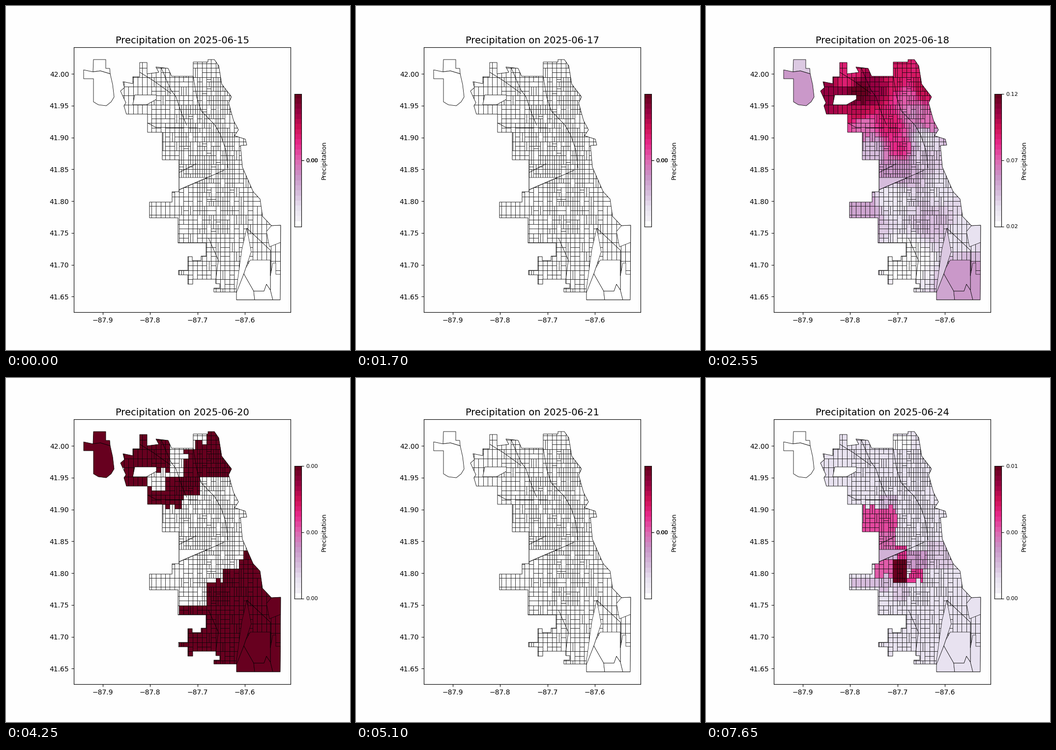
A matplotlib script that plays this animation: 700x700 px, repeating every 8000 ms.

```python
import random

import matplotlib as mpl
import matplotlib.pyplot as plt
import numpy as np
from matplotlib.animation import FuncAnimation
from matplotlib.collections import LineCollection, PolyCollection
from matplotlib.colors import ListedColormap
from matplotlib.patches import Polygon

STAGE, DPI = 700, 100
STEP, LOOP, HOLD = 50, 8000, 850
MILE = 18.7  # street grid pitch in pixels
LEVELS = 26
PAPER = "#fefefe"

# Map extent in degrees; the box keeps true proportions at its middle latitude
WEST, EAST, SOUTH, NORTH = -87.9609, -87.5033, 41.6256, 42.0419
TOP, BOTTOM = 84, 623
SCALE = (BOTTOM - TOP) / (NORTH - SOUTH)
LON_SCALE = SCALE * np.cos(np.radians((NORTH + SOUTH) / 2))
WIDTH = (EAST - WEST) * LON_SCALE
LEFT = .5125 * STAGE - WIDTH / 2


def stairs(x, y, *turns):
    """Right-angled path: each turn gives the next y, then the next x, and so on."""
    path = [(x, y)]
    for i, turn in enumerate(turns):
        x, y = (turn, y) if i % 2 else (x, turn)
        path.append((x, y))
    return path


shore = [(411, 109), (424, 109), (433, 122), (439, 159), (459, 185), (453, 197),
         (463, 233), (473, 252), (465, 264), (487, 271), (490, 283), (477, 284),
         (481, 328), (503, 378), (517, 393), (522, 428), (540, 447), (559, 446), (558, 598)]
land = stairs(469, 598, 582, 423, 574, 435, 565, 427, 556, 380, 566, 370, 547, 351,
              538, 370, 510, 379, 518, 397, 509, 407, 482, 350, 431, 292, 399, 338,
              378, 352, 313, 318, 257, 288, 220, 245)
north_west = [(240, 203), (244, 197), (233, 173), (241, 166), (238, 154),
              *stairs(258, 158, 144, 272, 115, 287, 138),
              (311, 135), (305, 124), (330, 127), (337, 143), *stairs(381, 143, 114, 411)]
city_limits = shore + land + north_west

creek = [(177, 134), (192, 132), (212, 138)]
airport_top = creek + stairs(211, 127, 127, 203, 109, 178)
airport = creek + [(217, 160), (220, 185), (214, 195), (204, 203), (188, 201),
                   *stairs(178, 195, 148, 158, 130)]
enclave = [(262, 181), (306, 181), (306, 190), (286, 201), (258, 201)]

# Far south-east: lakes and rail yards off the street grid
lake_west = [(490, 452), (499, 500), (488, 533), (484, 545), (504, 580)]
lake_south = [(525, 580), (530, 566), (538, 578)]
off_grid = [
    lake_west[:4] + [(467, 589), (480, 495)],
    [(469, 598), (467, 588), *lake_west[3:], (506, 598)],
    [(506, 598), lake_west[4], *lake_south, (543, 598)],
    [(543, 523), *stairs(549, 523, 546, 559, 598, 543), (538, 578), (538, 549)],
    lake_west[2:] + lake_south + [(538, 517), (497, 517)],
    [(530, 459), (540, 447), (559, 446), (559, 481), (536, 490)],
    [(352, 349), (410, 349), (352, 374)],
]

# River, canal, rail and motorway borders
borders = [
    [(381, 143), (388, 185), (397, 213), (425, 242), (437, 263), (447, 292), (452, 330)],
    [(316, 126), (335, 170), (346, 185), (357, 218), (368, 243)],
    [(271, 134), (300, 152), (336, 178)],
    [(288, 238), (305, 247), (390, 248)],
    [(352, 374), (410, 349), (444, 334)],
    [(352, 339), (387, 321)],
    [(412, 472), (432, 517), (427, 556)],
    [(490, 452), (538, 497), (538, 549)],
]

# Key readings as (x, y, level)
gauges_18 = [
    (250, 175, .88), (285, 138, .67), (314, 176, 1), (345, 165, .87), (310, 212, .8),
    (380, 150, .72), (440, 170, .75), (412, 185, .53), (320, 243, .48), (333, 295, .24),
    (375, 240, .68), (395, 290, .62), (420, 215, .42), (455, 230, .5), (445, 270, .14),
    (440, 305, .2), (385, 328, .38), (380, 390, .1), (480, 370, .14), (318, 415, .34),
    (462, 440, .24), (415, 510, 0), (520, 470, .13), (530, 550, .36),
]
gauges_19 = [
    (250, 170, .1), (320, 180, 0), (430, 165, 0), (320, 240, .08), (380, 205, .08),
    (345, 280, .25), (385, 310, .45), (420, 212, 1), (455, 225, .74), (405, 255, .65),
    (470, 260, .86), (430, 290, .65), (475, 330, .85), (410, 340, .72), (362, 365, .62),
    (320, 412, .78), (390, 405, .68), (460, 400, 1), (385, 465, .97), (500, 432, 1),
    (540, 462, .77), (430, 490, .93), (480, 510, .72), (530, 550, .6), (390, 540, .67),
    (455, 560, .5),
]

# Wet areas as (left, top, right, bottom, level); later ones win
areas_20 = [
    (230, 108, 332, 190, 1), (240, 190, 288, 222, 1), (288, 228, 357, 262, 1),
    (326, 198, 364, 246, 1), (362, 143, 393, 237, 1), (384, 133, 460, 204, 1),
    (411, 108, 440, 133, 1), (476, 357, 560, 390, 1), (443, 386, 560, 600, 1),
    (410, 413, 443, 600, 1), (350, 460, 410, 600, 1),
]
areas_24 = [
    (230, 100, 560, 600, .12), (381, 114, 418, 141, 0), (350, 237, 390, 277, .24),
    (318, 265, 385, 313, .55), (352, 313, 384, 349, .48), (352, 349, 388, 370, .28),
    (386, 339, 410, 380, .58), (338, 370, 376, 405, .52), (410, 349, 450, 386, .38),
    (413, 388, 443, 414, .58), (376, 370, 410, 415, 1), (292, 398, 374, 432, .25),
    (376, 415, 411, 452, .22), (450, 330, 504, 390, .2),
]


def tract_area(x, y):
    """Largest tract size allowed near a point: smallest in the crowded middle."""
    if x > 495 or x < 290 or (x < 350 and y > 380):
        return 180
    crowded = 390 < x < 466 and 143 < y < 470 or 350 < x < 390 and 200 < y < 345
    return 60 if crowded else 100


def split(x0, y0, x1, y1, limit):
    """Halve a block again and again until its parts are tract sized."""
    w, h = x1 - x0, y1 - y0
    if w * h < limit or (w * h < 200 and random.random() < .17):
        return [[(x0, y0), (x1, y0), (x1, y1), (x0, y1)]]
    if w * random.uniform(.9, 2.3) > h:
        mid = (x0 + x1) / 2
        return split(x0, y0, mid, y1, limit) + split(mid, y0, x1, y1, limit)
    mid = (y0 + y1) / 2
    return split(x0, y0, x1, mid, limit) + split(x0, mid, x1, y1, limit)


def street_tracts():
    random.seed(11)
    tracts = []
    for row in range(-8, 19):
        for col in range(-7, 12):
            x, y = 352 + col * MILE, 257 + row * MILE
            limit = tract_area(x + MILE / 2, y + MILE / 2)
            tracts += split(x, y, x + MILE, y + MILE, limit)
    return tracts


def from_gauges(points, gauges):
    gx, gy, level = np.array(gauges).T
    dist = np.hypot(points[:, :1] - gx, points[:, 1:] - gy) + 1
    weight = dist ** -4.0
    return weight @ level / weight.sum(axis=1)


def from_areas(points, areas):
    x, y = points.T
    level = np.zeros(len(points))
    for x0, y0, x1, y1, value in areas:
        level[(x >= x0) & (x < x1) & (y >= y0) & (y < y1)] = value
    return level


shades = mpl.colormaps["PuRd"](np.linspace(0, 1, LEVELS))
shades[0] = 1
cmap = ListedColormap(shades)

tracts = street_tracts() + off_grid
centres = np.array([np.mean(t, axis=0) for t in tracts])

# Per day: tract levels, airport levels (top, main), scale labels
wet = {
    18: (from_gauges(centres, gauges_18), (.22, .36), ("0.02", "0.07", "0.12")),
    19: (from_gauges(centres, gauges_19), (.1, .1), ("0.00", "0.01", "0.01")),
    20: (from_areas(centres, areas_20), (1., 1.), ("0.00", "0.00", "0.00")),
    24: (from_areas(centres, areas_24), (0., 0.), ("0.00", "0.00", "0.01")),
}
dry = (np.zeros(len(tracts)), (0., 0.), ("0.00",) * 3)

fig = plt.figure(figsize=(STAGE / DPI, STAGE / DPI), dpi=DPI, facecolor=PAPER)
ax = fig.add_axes([LEFT / STAGE, 1 - BOTTOM / STAGE, WIDTH / STAGE, (BOTTOM - TOP) / STAGE],
                  facecolor=PAPER)
ax.set_xlim(LEFT, LEFT + WIDTH)
ax.set_ylim(BOTTOM, TOP)
lons = -87.9 + .1 * np.arange(4)
lats = 41.65 + .05 * np.arange(8)
ax.set_xticks(LEFT + (lons - WEST) * LON_SCALE, [f"\u2212{-v:.1f}" for v in lons])
ax.set_yticks(TOP + (NORTH - lats) * SCALE, [f"{v:.2f}" for v in lats])
title = ax.set_title("", fontsize=14)

outline = Polygon(city_limits, fill=False, ec="black", lw=.6, zorder=3)
ax.add_patch(outline)
city = PolyCollection(tracts, edgecolors="black", linewidths=.5, zorder=1)
lines = LineCollection(borders, colors="black", linewidths=.6, zorder=2)
outer = PolyCollection([airport_top, airport, enclave], edgecolors="black",
                       linewidths=.6, zorder=4)
for part in (city, lines, outer):
    ax.add_collection(part, autolim=False)
for part in (city, lines):
    part.set_clip_path(outline)

cax = fig.add_axes([586.5 / STAGE, 1 - 448.5 / STAGE, 14 / STAGE, 269.5 / STAGE])
cax.imshow(np.arange(LEVELS)[:, None], cmap=cmap, origin="lower", aspect="auto",
           extent=(0, 1, 0, 1), interpolation="nearest")
cax.set_xticks([])
cax.yaxis.tick_right()
cax.yaxis.set_label_position("right")
cax.tick_params(labelsize=8)
cax.set_ylabel("Precipitation", fontsize=9)


def draw(i):
    day = 15 + i * STEP // HOLD
    levels, airport_levels, labels = wet.get(day, dry)
    title.set_text(f"Precipitation on 2025-06-{day}")
    city.set_facecolor(cmap(levels))
    outer.set_facecolor(cmap([*airport_levels, 0.]))
    # With no rain the scale has no range, so all its labels meet in the middle
    cax.set_yticks([0, .5, 1] if day in wet else [.5] * 3, labels)
    return city, outer, title


ani = FuncAnimation(fig, draw, frames=LOOP // STEP, interval=STEP, repeat=True,
                    repeat_delay=0, blit=False)
plt.show()
```
